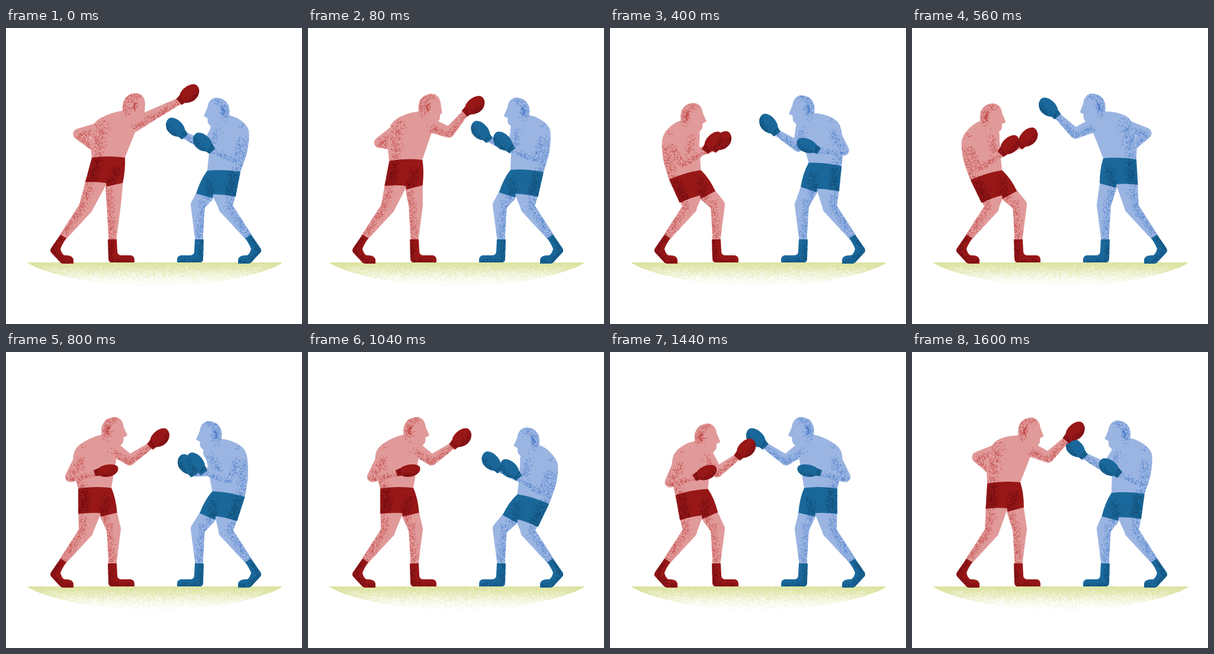
Animation, 500 px wide and 500 px high, one loop 1680 ms. Source, as an HTML page with a canvas:

```html
<!DOCTYPE html>
<html lang="en">
<head>
<meta charset="utf-8">
<title>Boxers</title>
<style>
html, body { margin: 0; width: 100%; height: 100%; overflow: hidden; background: #fff; }
canvas { display: block; width: 100%; height: 100%; }
</style>
</head>
<body>
<canvas id="stage" width="500" height="500"></canvas>
<script>
const SIZE = 500, LOOP = 1680, STEP = 80, MIRROR = 506, GROUND = 396;
const ctx = document.getElementById('stage').getContext('2d');

const RED = { skin: '#e19a9a', shade: '#bf4542', cloth: '#981717', dark: '#6c0d13' };
const BLUE = { skin: '#9bb5e2', shade: '#4b7dc8', cloth: '#1a689b', dark: '#124c74' };

// The feet never move and the knees hardly do, so they are shared by every pose.
const REAR_KNEE = [135, 303], FRONT_KNEE = [182, 299], BETWEEN_KNEES = [165, 300];
const REAR_ANKLE = [97, 352], FRONT_ANKLE = [180, 357];
const WAIST = 28, SHORTS = 43;

// Facing right. Waist and gloves carry an angle in degrees; turn is how far the back shows.
const hook  = { head: [217, 130], shoulder: [153, 157], waist: [173, 219, 0],   rear: [174, 211, 8],   lead: [310, 112, -34], turn: [1] };
const guard = { head: [176, 135], shoulder: [122, 158], waist: [143, 237, -7],  rear: [207, 178, -36], lead: [202, 188, -34], turn: [0] };
const lean  = { head: [126, 151], shoulder: [80, 188],  waist: [121, 252, -20], rear: [165, 198, -45], lead: [185, 193, -42], turn: [0] };
const jab   = { head: [181, 130], shoulder: [119, 162], waist: [150, 230, -1],  rear: [171, 201, -8],  lead: [260, 146, -38], turn: [0] };
const cross = { head: [199, 131], shoulder: [140, 152], waist: [155, 221, -2],  rear: [160, 211, 5],   lead: [276, 135, -40], turn: [.3] };
const parry = { head: [148, 138], shoulder: [98, 168],  waist: [138, 242, -2],  rear: [174, 194, -38], lead: [220, 169, -40], turn: [0] };
const cover = { head: [161, 137], shoulder: [104, 164], waist: [130, 240, -10], rear: [186, 188, -45], lead: [201, 191, -50], turn: [0] };

const RED_KEYS = [[0, hook], [3, guard], [6, lean], [10, jab], [13, jab], [16, lean], [20, cross], [21, hook]];
const BLUE_KEYS = [[0, parry], [3, cover], [7, cross], [10, cover], [12, lean], [16, jab], [18, jab], [21, parry]];

let seed = 1;
function random() {
  seed = (seed * 16807) % 2147483647;
  return seed / 2147483647;
}

const radians = degrees => degrees * Math.PI / 180;
const mix = (p, q, k) => p.map((v, i) => v + (q[i] - v) * k);
const add = ([x, y], dx, dy) => [x + dx, y + dy];
const polar = ([x, y], angle, r) => [x + r * Math.cos(angle), y + r * Math.sin(angle)];
const heading = (p, q) => Math.atan2(q[1] - p[1], q[0] - p[0]);
const distance = (p, q) => Math.hypot(q[0] - p[0], q[1] - p[1]);
const toward = (p, q, r) => polar(p, heading(p, q), r);

function poseAt(keys, step) {
  const i = keys.findIndex(([at]) => at > step);
  const [start, from] = keys[i - 1], [end, to] = keys[i];
  const u = (step - start) / (end - start), k = u * u * (3 - 2 * u);
  return Object.fromEntries(Object.keys(from).map(part => [part, mix(from[part], to[part], k)]));
}

// Two-bone joint that always bends to the same side.
function elbowOf(shoulder, wrist, upper, lower) {
  const d = distance(shoulder, wrist);
  const along = (upper * upper - lower * lower + d * d) / (2 * d);
  const out = Math.sqrt(Math.max(0, upper * upper - along * along));
  const angle = heading(shoulder, wrist);
  return polar(polar(shoulder, angle, along), angle + Math.PI / 2, out);
}

function curve(points) {
  const path = new Path2D(), last = points.length - 1;
  path.moveTo(...points[0]);
  for (let i = 0; i < last; i++) {
    const a = points[Math.max(i - 1, 0)], b = points[i], c = points[i + 1], d = points[Math.min(i + 2, last)];
    path.bezierCurveTo(b[0] + (c[0] - a[0]) / 6, b[1] + (c[1] - a[1]) / 6,
      c[0] - (d[0] - b[0]) / 6, c[1] - (d[1] - b[1]) / 6, ...c);
  }
  path.closePath();
  return path;
}

// Chain of tapered capsules.
function limb(points, radii) {
  const path = new Path2D(), h = Math.PI / 2;
  for (let i = 0; i < points.length - 1; i++) {
    const p = points[i], q = points[i + 1], a = heading(p, q);
    path.moveTo(...polar(p, a + h, radii[i]));
    path.arc(...p, radii[i], a + h, a + 3 * h);
    path.arc(...q, radii[i + 1], a - h, a + h);
    path.closePath();
  }
  return path;
}

function fill(shape, color) {
  ctx.fillStyle = color;
  ctx.fill(shape);
}

// Scatter specks around a line, kept inside the shape.
function grain(shape, line, spread, color, density = .6) {
  const scatter = () => (random() + random() + random() - 1.5) * spread * 1.3;
  ctx.save();
  ctx.clip(shape);
  ctx.fillStyle = color;
  for (let i = 0; i < line.length - 1; i++) {
    const count = Math.round(distance(line[i], line[i + 1]) * spread * density);
    for (let n = 0; n < count; n++) {
      const [x, y] = mix(line[i], line[i + 1], random());
      const size = .7 + random() * .6;
      ctx.fillRect(x + scatter(), y + scatter(), size, size);
    }
  }
  ctx.restore();
}

const GLOVE = new Path2D('M-14-9C-8-15 9-17 17-9C23-1 15 12 3 13C-5 14-12 10-15 7Z');
const CUFF = new Path2D('M-23-6L-13-9L-11 8L-21 8Z');
const REAR_BOOT = new Path2D('M92 349L102 355Q95 365 92 373Q94 382 99 384Q112 383 114 391L114 398H95Q92 397 89 393L76 379Q74 376 76 372Z');
const FRONT_BOOT = new Path2D('M172 357L187 357L188 377Q188 384 195 384L211 384Q217 385 217 392V396H178Q173 396 173 389Z');

function drawGlove([x, y, angle], colors, density) {
  ctx.save();
  ctx.translate(x, y);
  ctx.rotate(radians(angle));
  ctx.scale(1, .68 + .28 * Math.min(1, Math.abs(angle) / 33)); // level gloves look slimmer
  fill(CUFF, colors.cloth);
  grain(CUFF, [[-17, -8], [-15, 9]], 5, colors.dark, 1.2);
  fill(GLOVE, colors.cloth);
  grain(GLOVE, [[-13, 8], [3, 11], [16, 4]], 6, colors.dark, density);
  ctx.restore();
}

function drawArm(shoulder, [x, y, angle], upper, radius, colors) {
  const wrist = polar([x, y], radians(angle), -18);
  const joints = [shoulder, elbowOf(shoulder, wrist, upper, 45), wrist];
  const shape = limb(joints, [radius, 9, 5.5]);
  fill(shape, colors.skin);
  grain(shape, joints.map(p => add(p, -1, 4)), 6, colors.shade);
}

function drawHead([x, y], turn, colors) {
  const nose = 1 - turn * turn, ear = 2 - 10 * nose;
  ctx.save();
  ctx.translate(x, y);
  ctx.rotate(radians(-5 * nose));
  const shape = new Path2D('M-19 14C-22 2-20-19 2-20C13-20 18-11 18-2'
    + `L${17 + 6 * nose} 13L16 16Q16 25 12 27Q7 32 1 30L-16 30Z`);
  fill(shape, colors.skin);
  grain(shape, [[-14, 14], [-15, -4], [-5, -16], [8, -18]], 8, colors.shade, .5);
  grain(shape, [[ear, -4], [ear - 3, 7]], 4, colors.shade, .9);
  ctx.strokeStyle = colors.shade;
  ctx.lineWidth = 2;
  ctx.beginPath();
  ctx.arc(ear + 4, 3, 7, 2.2, 4.4);
  ctx.stroke();
  ctx.restore();
}

function drawLeg(outer, inner, knee, ankle, colors) {
  const hip = mix(outer, inner, .5);
  const shape = limb([hip, knee, ankle], [distance(outer, inner) / 2, 12, 6.5]);
  fill(shape, colors.skin);
  grain(shape, [add(hip, -9, 0), add(knee, -8, 0), add(ankle, -3, 0)], 7, colors.shade, .55);
}

function drawBoot(shape, line, colors) {
  fill(shape, colors.cloth);
  grain(shape, line, 5, colors.dark, .8);
}

function drawBoxer({ head, shoulder, waist, rear, lead, turn: [turn] }, colors) {
  seed = 4321;
  const tilt = radians(waist[2]);
  const back = polar(waist, tilt, -WAIST), front = polar(waist, tilt, WAIST);
  const rearHem = toward(back, add(REAR_KNEE, -13, 2), SHORTS);
  const frontHem = toward(front, add(FRONT_KNEE, 12, 0), SHORTS);
  const crotch = toward(waist, BETWEEN_KNEES, SHORTS);
  const throat = add(head, 10, 23);
  const spine = add(mix(shoulder, back, .5), -6, 0);
  const behind = turn > .2;
  const rearArm = () => drawArm(add(shoulder, 10, 12), rear, 42, 11, colors);

  if (behind) rearArm();
  drawLeg(frontHem, add(crotch, -1, 3), FRONT_KNEE, FRONT_ANKLE, colors);
  drawLeg(rearHem, crotch, REAR_KNEE, REAR_ANKLE, colors);
  drawBoot(FRONT_BOOT, [[175, 360], [176, 392], [212, 395]], colors);
  drawBoot(REAR_BOOT, [[92, 352], [78, 376], [96, 396], [112, 396]], colors);

  const torso = curve([back, spine, shoulder, add(head, -20, 10), throat, mix(throat, front, .42), front]);
  fill(torso, colors.skin);
  grain(torso, [back, spine, shoulder].map(p => add(p, 7 + 5 * turn, 2)), 9, colors.shade, .5);
  drawArm(add(head, 0, 33), lead, 34, 12, colors);
  drawHead(head, turn, colors);
  if (!behind) rearArm();

  const shorts = new Path2D();
  shorts.moveTo(...back);
  shorts.quadraticCurveTo(...add(waist, 0, -4), ...front);
  shorts.quadraticCurveTo(...add(mix(front, frontHem, .5), 3, -3), ...frontHem);
  shorts.lineTo(...add(crotch, 1, 6));
  shorts.lineTo(...crotch);
  shorts.quadraticCurveTo(...add(mix(crotch, rearHem, .5), 0, -2), ...rearHem);
  shorts.closePath();
  fill(shorts, colors.cloth);
  grain(shorts, [add(back, 9, 0), add(rearHem, 9, 0)], 9, colors.dark, 1);
  grain(shorts, [mix(front, crotch, .4), add(crotch, 4, 3)], 7, colors.dark, 1);

  drawGlove(lead, colors, 1);
  if (!behind) drawGlove(rear, colors, .8);
}

function makeGround() {
  const layer = document.createElement('canvas');
  layer.width = layer.height = SIZE;
  const g = layer.getContext('2d');
  g.fillStyle = '#dce29f';
  seed = 99;
  for (let y = GROUND; y < GROUND + 40; y++) {
    const depth = (y - GROUND) / 40;
    const half = 215 * Math.sqrt(1 - depth ** 1.25);
    for (let x = Math.ceil(251 - half); x < 251 + half; x++) {
      const rim = Math.max(0, Math.abs(x - 251) / half - .9) * 3;
      g.globalAlpha = Math.min(1, Math.max(0, 1.2 - 1.4 * depth ** .8 + rim * (1 - depth) + (random() - .5) * .8));
      g.fillRect(x, y, 1, 1);
    }
  }
  return layer;
}

const ground = makeGround();
let shown = -1;

function draw() {
  const step = Math.floor((performance.now() % LOOP) / STEP);
  if (step !== shown) {
    shown = step;
    ctx.fillStyle = '#fff';
    ctx.fillRect(0, 0, SIZE, SIZE);
    ctx.drawImage(ground, 0, 0);
    ctx.save();
    ctx.translate(MIRROR, 0);
    ctx.scale(-1, 1);
    drawBoxer(poseAt(BLUE_KEYS, step), BLUE);
    ctx.restore();
    drawBoxer(poseAt(RED_KEYS, step), RED);
  }
  requestAnimationFrame(draw);
}
draw();
</script>
</body>
</html>
```
